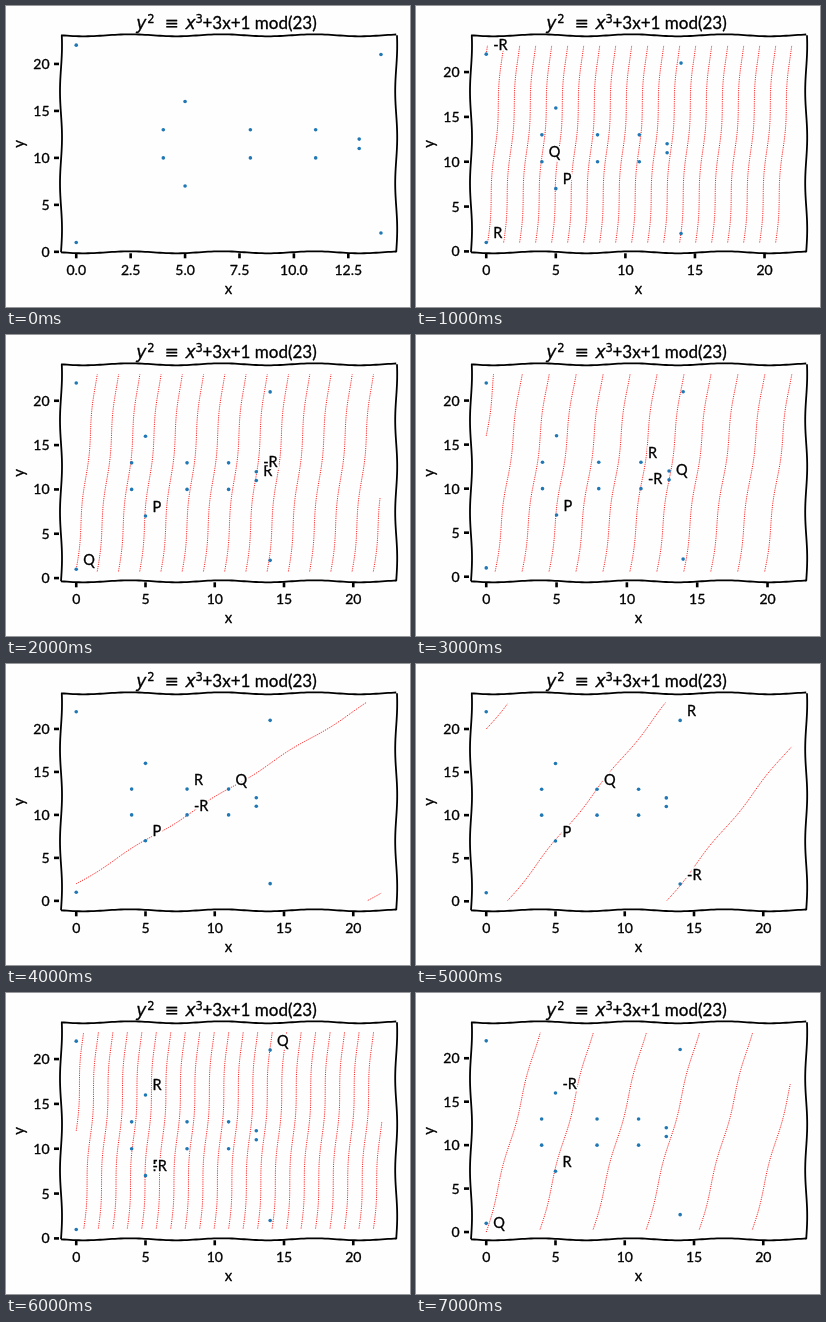
Animation of 404x301 px, one loop 8000 ms. Source, as an HTML page with a canvas:

```html
<!DOCTYPE html>
<html lang="en">
<head>
<meta charset="utf-8">
<title>Point addition on a curve modulo 23</title>
<style>
html, body { margin: 0; width: 100%; height: 100%; overflow: hidden; background: #fefefe; }
canvas { display: block; }
</style>
</head>
<body>
<canvas id="stage" width="404" height="301"></canvas>
<script>
const ctx = document.getElementById('stage').getContext('2d');
const M = 23, A = 3, B = 1;
const LEFT = 55, BOTTOM = 246.3, W = 335.2, H = 217;
const PAPER = '#fefefe', HAND = 'Lato, sans-serif', MATH = '"DejaVu Sans", sans-serif';
const mod = n => ((n % M) + M) % M;

function inverse(n) {
  let i = 1;
  while (mod(i * n) !== 1) i++;
  return i;
}

// All points of the curve with x up to 14
const points = [];
for (let x = 0; x < 15; x++)
  for (let y = 0; y < M; y++)
    if (mod(y * y - x ** 3 - A * x - B) === 0) points.push([x, y]);

// Repeatedly add P; the point at infinity is shown as (0, 0)
const P = [5, 7];
const steps = [null];
let Q = [4, 10];
while (steps.length < 8) {
  if (steps.length === 7) Q = [0, 0];
  const slope = mod(mod(Q[1] - P[1]) * inverse(mod(Q[0] - P[0])));
  const start = mod(P[1] - slope * P[0]);
  const infinite = Q[0] + Q[1] === 0;
  const x = infinite ? P[0] : mod(slope * slope - P[0] - Q[0]);
  const y = mod(slope * x + start);
  const R = infinite ? P : [x, mod(-y)];
  steps.push({ Q, R, minusR: [x, mod(-R[1])], slope, pieces: wrap(slope, start) });
  Q = R;
}

// Split y = slope * x + start into pieces inside 0..23
function wrap(slope, start) {
  const pieces = [];
  for (let k = 0, x = 0; x < 22; k++) {
    const end = Math.min(22, ((k + 1) * M - start) / slope);
    const from = k ? x + 0.05 : 0;
    if (end < 22 || end - x > 0.5)
      pieces.push([from, slope * from + start - k * M, end, slope * end + start - k * M]);
    x = end;
  }
  return pieces;
}

// Hand-drawn line: a straight run with a slow sideways sway
function wobble(x1, y1, x2, y2) {
  const len = Math.hypot(x2 - x1, y2 - y1) || 1;
  const nx = (y1 - y2) / len, ny = (x2 - x1) / len;
  ctx.beginPath();
  for (let d = 0; d < len + 3; d += 3) {
    const s = Math.min(d, len), f = s / len;
    const sway = Math.sin(s / 92 * 2 * Math.PI);
    ctx.lineTo(x1 + (x2 - x1) * f + nx * sway, y1 + (y2 - y1) * f + ny * sway);
  }
  ctx.stroke();
}

function ink(str, x, y, font) {
  ctx.font = font;
  ctx.fillStyle = ctx.strokeStyle = '#000';
  ctx.lineWidth = 0.3;
  ctx.strokeText(str, x, y);
  ctx.fillText(str, x, y);
}

// Lettering with a paper-coloured halo
function text(str, x, y, align = 'center', size = 14) {
  ctx.font = `${size}px ${HAND}`;
  ctx.textAlign = align;
  ctx.lineJoin = 'round';
  ctx.lineWidth = 4;
  ctx.strokeStyle = PAPER;
  ctx.strokeText(str, x, y);
  ink(str, x, y, ctx.font);
}

function title() {
  const math = 'oblique 17px ' + MATH, power = '11.5px ' + MATH;
  ctx.textAlign = 'left';
  ink('y', 130.3, 23, math);
  ink('2', 141.3, 17, power);
  ink('≡', 158.5, 23, '17px ' + MATH);
  ink('x', 179.5, 23, math);
  ink('3', 189.5, 17, power);
  ink('+3x+1 mod(23)', 196.5, 23, '17px ' + HAND);
}

function axes(px, py, xTick, xLast, digits) {
  const right = LEFT + W, top = BOTTOM - H;
  ctx.strokeStyle = '#000';
  ctx.lineWidth = 1.8;
  wobble(LEFT, BOTTOM, right, BOTTOM);
  wobble(LEFT, top, right, top);
  wobble(LEFT, BOTTOM, LEFT, top);
  wobble(right, BOTTOM, right, top);

  for (let x = 0; x <= xLast; x += xTick) {
    ctx.fillStyle = '#000';
    ctx.fillRect(px(x) - 1.3, BOTTOM + 1, 2.6, 5);
    text(x.toFixed(digits), px(x), 269);
  }
  for (let y = 0; y <= 20; y += 5) {
    ctx.fillStyle = '#000';
    ctx.fillRect(LEFT - 7, py(y) - 1.3, 5, 2.6);
    text(y, 43.5, py(y) + 5, 'right');
  }
  text('x', 222.5, 288, 'center', 15);
  ctx.save();
  ctx.translate(17.5, 138);
  ctx.rotate(-Math.PI / 2);
  text('y', 0, 0, 'center', 15);
  ctx.restore();
}

function draw(step) {
  ctx.fillStyle = PAPER;
  ctx.fillRect(0, 0, 404, 301);

  // Axis limits follow the data with a 5% margin
  const xMax = step ? step.pieces.at(-1)[2] : 14;
  const yMin = step ? Math.min(1, step.slope * 0.05) : 1;
  const yMax = step ? 23 : 22;
  const sx = W / (xMax * 1.1), sy = H / ((yMax - yMin) * 1.1);
  const px = x => LEFT + (x + xMax * 0.05) * sx;
  const py = y => BOTTOM - (y - yMin + (yMax - yMin) * 0.05) * sy;

  if (step) {
    ctx.strokeStyle = '#f00';
    ctx.lineWidth = 0.9;
    ctx.setLineDash([1.1, 1.1]);
    for (const [x1, y1, x2, y2] of step.pieces) wobble(px(x1), py(y1), px(x2), py(y2));
    ctx.setLineDash([]);
  }

  for (const [x, y] of points) {
    ctx.beginPath();
    ctx.arc(px(x), py(y), 1.8, 0, 7);
    ctx.fillStyle = '#1f77b4';
    ctx.fill();
  }
  if (step) axes(px, py, 5, 20, 0);
  else axes(px, py, 2.5, 12.5, 1);
  title();

  if (step) {
    const label = (str, [x, y]) => text(str, px(x + 0.5), py(y + 0.5), 'left', 14.5);
    label('P', P);
    label('Q', step.Q);
    label('R', step.R);
    label('-R', step.minusR);
  }
}

function frame() {
  draw(steps[Math.floor(performance.now() % 8000 / 1000)]);
  requestAnimationFrame(frame);
}
frame();
</script>
</body>
</html>
```
